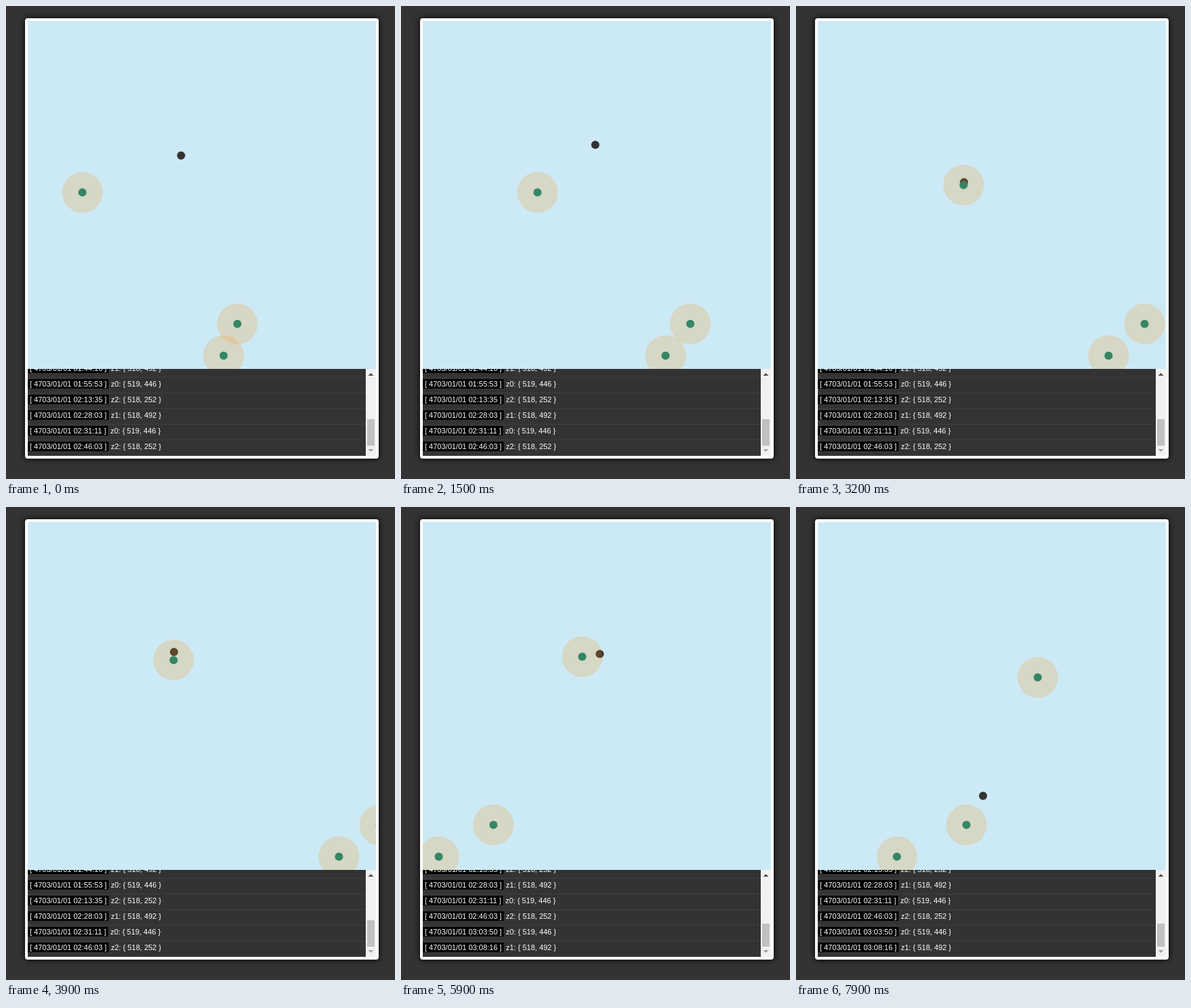
Write an HTML page that moves like this. It is 572 px wide and 696 px high and loops after 8000 ms.

```html
<!DOCTYPE html>
<html lang="en">
<head>
<meta charset="utf-8">
<title>Drifting zones</title>
<style>
  html, body { margin: 0; width: 100%; height: 100%; overflow: hidden; background: #333; }
  #panel { position: absolute; left: 28px; top: 18px; width: 512px; height: 640px;
    border: 4px solid #fff; border-radius: 4px; background: #fff; box-shadow: 0 0 10px #000; }
  #sea { display: block; width: 512px; height: 512px; background: #cceaf6; }
  #log { position: relative; height: 128px; overflow: hidden; background: #333; }
  #rows { position: absolute; left: 0; bottom: 0; width: 497px;
    font: 11px/18px "Liberation Sans", Arial, sans-serif; color: #fff; }
  #rows div { height: 18px; padding-bottom: 4px; border-bottom: 1px solid #3f3f3f; white-space: pre; }
  #rows span { background: #000; padding: 1px 3px; }
  #bar { position: absolute; right: 0; top: 0; width: 15px; height: 128px; background: #f1f1f1; }
  #thumb { position: absolute; left: 2px; bottom: 15px; width: 11px; background: #c1c1c1; }
  #bar svg { position: absolute; left: 0; top: 0; }
</style>
</head>
<body>
<div id="panel">
  <svg id="sea" viewBox="32 22 512 512"><circle id="player" r="6" fill="#333"/></svg>
  <div id="log">
    <div id="rows"></div>
    <div id="bar">
      <div id="thumb"></div>
      <svg width="15" height="128">
        <path d="M3.5 10h8l-4-4z" fill="#505050"/>
        <path d="M3.5 118h8l-4 4z" fill="#a3a3a3"/>
      </svg>
    </div>
  </div>
</div>
<script>
const LOOP = 8000, STEP = 100, EDGE = 550.5;
const HOLDS = [[2400, 2800], [6900, 7100]];
const $ = id => document.getElementById(id);

// Shared clock of all zones, slightly uneven: [time, distance]
const drift = [[0, 0], [1500, 69], [2400, 105.3], [3900, 169.6], [5000, 216], [6700, 298.2], [7900, 352.4]];

// Zones that only drift right; one that leaves comes back `span` px further left
const drifters = [
  { start: 340.2, speed: 1.235, y: 467.7, span: 524.8 },
  { start: 320, speed: 1, y: 514.4, span: 524 },
];

// Turning points of the zone that drifts, chases the player and drifts on
const chase = [[112.3, 274.3], [242.2, 274.3], [247.4, 279.5], [246.4, 293.4], [246.4, 188.3],
  [246.4, 243.4], [267, 219.5], [291.5, 245.5], [277.3, 250.7], [400, 250.7]];
const CHASE_SPEED = 1.281;

// Player: [time, x, y]
const walk = [[0, 257.5, 220], [1100, 271, 163], [1500, 285.7, 204.3], [2400, 247, 279.5],
  [2800, 247, 281], [3900, 247, 213.2], [4450, 247, 180], [5000, 247, 227.2], [5300, 248, 246],
  [5850, 288, 216], [6100, 303, 232], [6700, 228, 302.2], [7900, 275, 425]];

const events = ["01:33:02 z0", "01:44:16 z1", "01:55:53 z0", "02:13:35 z2", "02:28:03 z1",
  "02:31:11 z0", "02:46:03 z2", "03:03:50 z0", "03:08:16 z1"];
const spots = { z0: "519, 446", z1: "518, 492", z2: "518, 252" };

const mix = (a, b, u) => a + (b - a) * u;

function segment(keys, t) {
  let i = 0;
  while (i < keys.length - 2 && t >= keys[i + 1][0]) i++;
  return i;
}

function linear(keys, t) {
  const i = segment(keys, t), [a, b] = [keys[i], keys[i + 1]];
  return mix(a[1], b[1], (t - a[0]) / (b[0] - a[0]));
}

function smooth(keys, t, c) {
  const i = segment(keys, t), a = keys[i], b = keys[i + 1];
  const slope = k => {
    const p = keys[Math.max(k - 1, 0)], n = keys[Math.min(k + 1, keys.length - 1)];
    return (n[c] - p[c]) / (n[0] - p[0]);
  };
  const d = b[0] - a[0], u = (t - a[0]) / d, v = 1 - u;
  return v * v * ((1 + 2 * u) * a[c] + u * d * slope(i))
       + u * u * ((3 - 2 * u) * b[c] - v * d * slope(i + 1));
}

// Both axes move at once, so the longer one sets the length of a leg
function along(points, dist) {
  for (let i = 1; ; i++) {
    const [ax, ay] = points[i - 1], [bx, by] = points[i];
    const leg = Math.max(Math.abs(bx - ax), Math.abs(by - ay));
    if (dist <= leg || i === points.length - 1) return [mix(ax, bx, dist / leg), mix(ay, by, dist / leg)];
    dist -= leg;
  }
}

function place(el, x, y) {
  el.setAttribute("transform", `translate(${x.toFixed(2)} ${y.toFixed(2)})`);
}

const zones = [0, 1, 2].map(() => {
  const g = document.createElementNS("http://www.w3.org/2000/svg", "g");
  g.innerHTML = '<circle r="30" fill="#ff8c00" fill-opacity=".2"/><circle r="6" fill="#338666"/>';
  $("sea").append(g);
  return g;
});

let shown = -1;
function showLog(extra) {
  if (extra === shown) return;
  shown = extra;
  $("rows").innerHTML = events.slice(extra, extra + 7).map(e => {
    const [time, zone] = e.split(" ");
    return `<div><span>[ 4703/01/01 ${time} ]</span> ${zone}: { ${spots[zone]} }</div>`;
  }).join("");
  $("thumb").style.height = Math.round(39 - 2.5 * extra) + "px";
}

function draw() {
  let t = Math.floor(performance.now() % LOOP / STEP) * STEP;
  for (const [from, to] of HOLDS) if (t >= from && t < to) t = from;

  const s = linear(drift, t);
  let wraps = 0;
  drifters.forEach(({ start, speed, y, span }, i) => {
    let x = start + speed * s;
    if (x > EDGE) { x -= span; wraps++; }
    place(zones[i], x, y);
  });
  place(zones[2], ...along(chase, CHASE_SPEED * s));
  place($("player"), smooth(walk, t, 1), smooth(walk, t, 2));
  showLog(wraps);
  requestAnimationFrame(draw);
}
draw();
</script>
</body>
</html>
```
